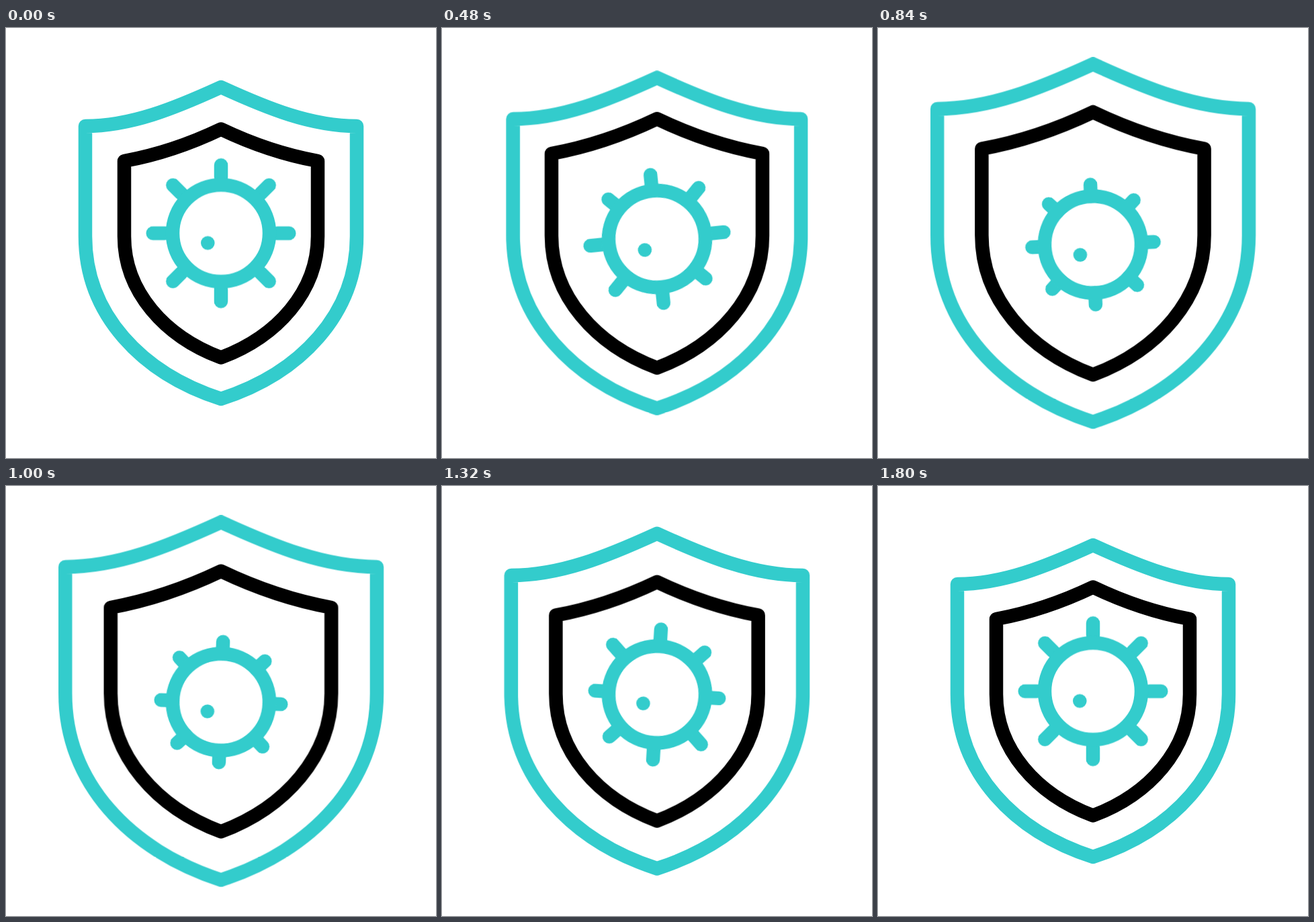
Write an HTML page that moves like this. It is 640 px wide and 640 px high and loops after 1880 ms.

```html
<!DOCTYPE html>
<html lang="en">
<head>
<meta charset="utf-8">
<title>Virus shield</title>
<style>
  html, body { margin: 0; width: 100%; height: 100%; overflow: hidden; background: #fff; }
  svg { display: block; width: 100vw; height: 100vh; }

  svg * {
    animation-duration: 1880ms;
    animation-iteration-count: infinite;
    animation-timing-function: cubic-bezier(.5, 0, .5, 1);
    transform-origin: 0 0;
  }

  .shape {
    fill: none;
    stroke: #3cc;
    stroke-width: 20.5;
    stroke-linecap: round;
    stroke-linejoin: round;
    vector-effect: non-scaling-stroke;
  }
  .shield { animation-name: swell; }
  .outer { animation-delay: 120ms; }
  .inner { stroke: #000; animation-delay: 40ms; }
  .drop { animation-name: drop; animation-delay: 80ms; }
  .sway { animation-name: sway; animation-delay: 80ms; }
  .dot { fill: #3cc; }

  /* Opposite spikes move together, each pair 80 ms after the last. */
  .spike {
    --angle: calc(var(--i) * 45deg);
    transform: rotate(var(--angle));
    animation-name: retract;
    animation-delay: calc(40ms + var(--pair) * 80ms);
  }

  @keyframes swell {
    0%, 85.11%, 100% { transform: scale(1); }
    42.55% { transform: scale(1.15); }
  }
  @keyframes drop {
    0%, 80.85%, 100% { transform: translateY(0); }
    42.55% { transform: translateY(16.9px); }
  }
  @keyframes sway {
    0%, 80.85%, 100% { transform: rotate(0deg); }
    25.53% { transform: rotate(-6.1deg); }
    60.64% { transform: rotate(4deg); }
  }
  @keyframes retract {
    0%, 80.85%, 100% { transform: rotate(var(--angle)) translateX(0); }
    40.43% { transform: rotate(var(--angle)) translateX(-12px); }
  }
</style>
</head>
<body>
<svg viewBox="-320 -320 640 640">
  <path class="shape shield outer" d="M0-232C70-200 134-174 202-174V-10C202 106 118 194 0 232C-118 194-202 106-202-10V-174C-134-174-70-200 0-232Z"/>
  <path class="shape shield inner" d="M0-169.5C45-148 97-130.5 144-122V-10C144 72 84 139 0 170.5C-84 139-144 72-144-10V-122C-97-130.5-45-148 0-169.5Z"/>
  <g transform="translate(0 -14.5)">
    <g class="drop">
      <g class="sway">
        <path class="shape spike" style="--i:1;--pair:0" d="M84 0H101.3"/>
        <path class="shape spike" style="--i:2;--pair:1" d="M84 0H101.3"/>
        <path class="shape spike" style="--i:3;--pair:2" d="M84 0H101.3"/>
        <path class="shape spike" style="--i:4;--pair:3" d="M84 0H101.3"/>
        <path class="shape spike" style="--i:5;--pair:0" d="M84 0H101.3"/>
        <path class="shape spike" style="--i:6;--pair:1" d="M84 0H101.3"/>
        <path class="shape spike" style="--i:7;--pair:2" d="M84 0H101.3"/>
        <path class="shape spike" style="--i:8;--pair:3" d="M84 0H101.3"/>
        <circle class="shape" r="72"/>
        <circle class="dot" cx="-19.7" cy="14.5" r="10.3"/>
      </g>
    </g>
  </g>
</svg>
</body>
</html>
```
